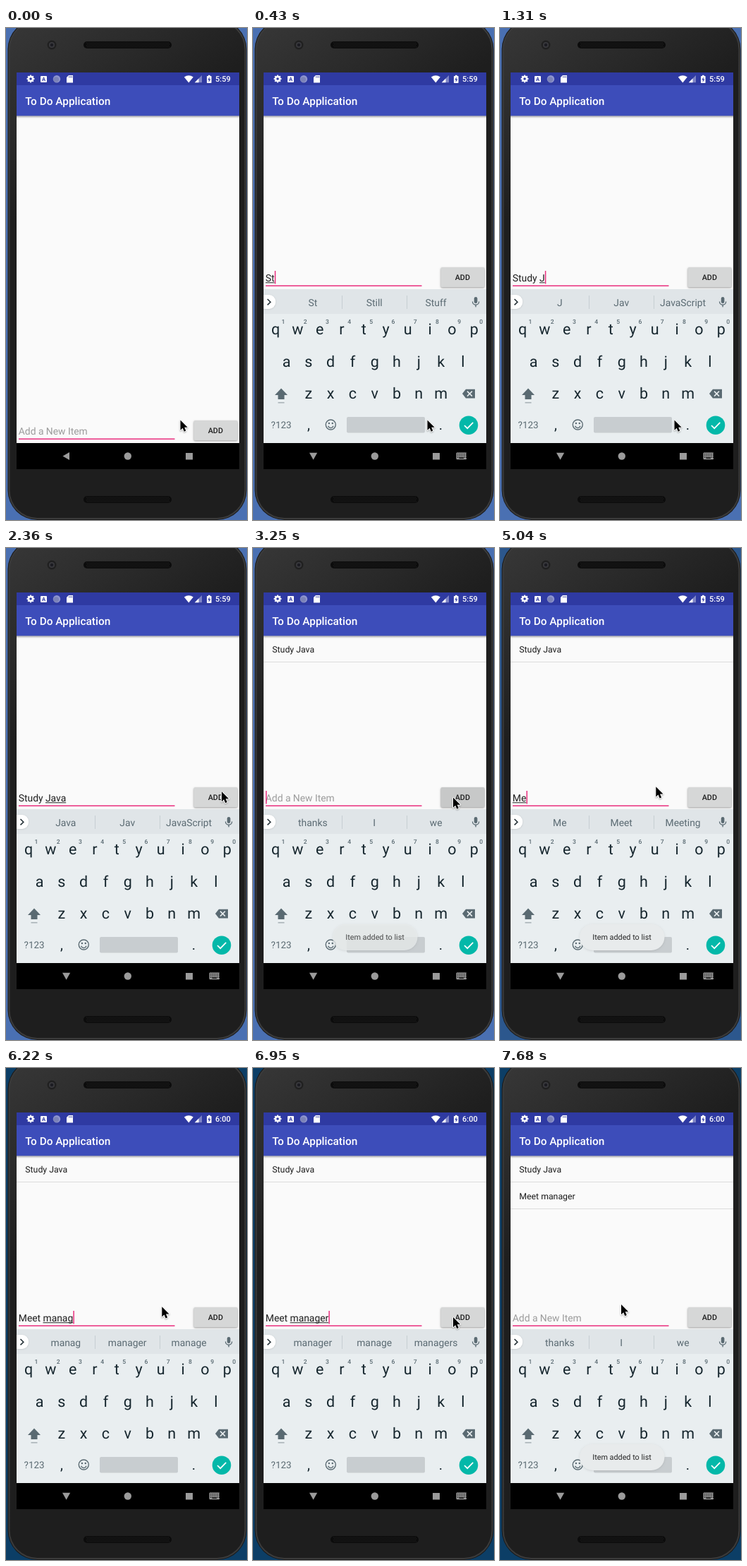
These frames come from a looping animation (342x697 px, 8 s). An HTML page with a canvas:

```html
<!DOCTYPE html>
<html lang="en">
<head>
<meta charset="utf-8">
<title>To Do Application</title>
<style>
html, body { margin: 0; width: 100%; height: 100%; overflow: hidden; background: #4a70b2; }
canvas { display: block; width: 342px; height: 697px; }
</style>
</head>
<body>
<canvas id="stage"></canvas>
<script>
const W = 342, H = 697, LOOP = 8000;
const OPEN = 140, KEY = 147, BLINK = 600;
const canvas = document.getElementById('stage');
const ratio = window.devicePixelRatio || 1;
canvas.width = W * ratio;
canvas.height = H * ratio;
const c = canvas.getContext('2d');
c.textRendering = 'geometricPrecision';
const FONT = 'Roboto, "Noto Sans", sans-serif';
const INK = '#16262e', SOFT = '#5a6a72', PINK = '#ea2f7e', STATUS = '#2f3aa2';

// Each run types one character every KEY ms
const runs = [[280, 'Study '], [1305, 'Java'], [4890, 'Meet manager']];
const tasks = [{ name: 'Study Java', added: 3100 }, { name: 'Meet manager', added: 7390 }];
const dictionary = ('So Still Stuff Study Student Jav JavaScript Java ' +
  'Meet Meeting Meets me my manager manage managers').split(' ');
const moves = [
  { start: 1850, time: 360, x: 306, y: 345 },
  { start: 2560, time: 400, x: 284, y: 353.5 },
  { start: 3260, time: 290, x: 221.3, y: 338.3 },
  { start: 6510, time: 440, x: 284, y: 353 },
  { start: 7390, time: 280, x: 172, y: 335 }
];

const ramp = (t, a, b) => Math.min(1, Math.max(0, (t - a) / (b - a)));
const smooth = p => p * p * (3 - 2 * p);

function inputAt(t) {
  let value = '', last = OPEN;
  const cleared = Math.max(0, ...tasks.map(k => k.added).filter(a => a <= t));
  for (const [start, chars] of runs) {
    if (t < start || start < cleared) continue;
    const n = Math.min(chars.length, Math.floor((t - start) / KEY) + 1);
    value += chars.slice(0, n);
  }
  for (const [start, chars] of runs)
    if (t >= start) last = start + KEY * Math.min(chars.length - 1, Math.floor((t - start) / KEY));
  for (const { added } of tasks)
    if (t >= added + 300) last = Math.max(last, added + 300);
  const caret = t >= OPEN && Math.floor((t - last) / BLINK) % 2 === 0;
  return { value, caret };
}

function suggest(value) {
  const word = value.slice(value.lastIndexOf(' ') + 1);
  if (!word) return ['thanks', 'I', 'we'];
  const stem = word.slice(0, 3);
  return [word, ...dictionary.filter(d => d !== word && d.startsWith(stem))].slice(0, 3);
}

function mouseAt(t) {
  let x = 247.5, y = 555.5;
  for (const m of moves) {
    const p = smooth(ramp(t, m.start, m.start + m.time));
    x += (m.x - x) * p;
    y += (m.y - y) * p;
  }
  return [x, y];
}

function rect(x, y, w, h, fill) {
  c.fillStyle = fill;
  c.fillRect(x, y, w, h);
}
function round(x, y, w, h, r, fill) {
  c.beginPath();
  c.roundRect(x, y, w, h, r);
  c.fillStyle = fill;
  c.fill();
}
function disc(x, y, r, fill) {
  c.beginPath();
  c.arc(x, y, r, 0, Math.PI * 2);
  c.fillStyle = fill;
  c.fill();
}
function arc(x, y, r, from, to, stroke, width) {
  c.beginPath();
  c.arc(x, y, r, from, to);
  c.strokeStyle = stroke;
  c.lineWidth = width;
  c.stroke();
}
function poly(points, fill) {
  c.beginPath();
  points.forEach(([x, y]) => c.lineTo(x, y));
  c.closePath();
  c.fillStyle = fill;
  c.fill();
}
function line(points, stroke, width) {
  c.beginPath();
  points.forEach(([x, y]) => c.lineTo(x, y));
  c.strokeStyle = stroke;
  c.lineWidth = width;
  c.stroke();
}
function text(s, x, y, size, fill, align = 'left', weight = 400) {
  c.font = `${weight} ${size}px ${FONT}`;
  c.textAlign = align;
  c.fillStyle = fill;
  c.fillText(s, x, y);
}
function shadow(color, blur, dy) {
  c.shadowColor = color;
  c.shadowBlur = blur * ratio;
  c.shadowOffsetY = dy * ratio;
}
function noShadow() {
  shadow('transparent', 0, 0);
}
function fade(x0, y0, x1, y1, ...stops) {
  const g = c.createLinearGradient(x0, y0, x1, y1);
  stops.forEach((s, i) => g.addColorStop(i / (stops.length - 1), s));
  return g;
}

function speaker(y) {
  round(110, y, 125, 10, 5, '#0c0c0c');
  c.fillStyle = '#2a2a2a';
  for (let row = 0; row < 4; row++)
    for (let x = 114 + row % 2; x < 232; x += 2) c.fillRect(x, y + 1.5 + row * 2, .9, .9);
}

function drawPhone(t) {
  const k = 1 - (1 - ramp(t, 4800, 5640)) ** 2;
  const mix = (a, b) => Math.round(a + (b - a) * k);
  rect(0, 0, W, H, `rgb(${mix(74, 12)},${mix(112, 62)},${mix(178, 102)})`);
  round(2.5, -12, 339, 709, 42, '#191919');
  round(3.5, -11, 337, 707, 41, '#3b3b3b');
  round(5.5, -9, 333, 703, 39, fade(0, 0, 130, 190, '#373737', '#2b2b2b', '#1e1e1e'));
  speaker(19);
  speaker(663);
  disc(65, 24, 6.5, '#202020');
  disc(65, 24, 4, '#39393d');
  disc(65, 24, 2.3, '#1c1c22');
}

function drawStatus(t) {
  const white = '#fff';
  rect(15, 63, 316, 18, STATUS);
  for (let i = 0; i < 8; i++) {
    const a = i * Math.PI / 4;
    line([[35, 72], [35 + 5.4 * Math.cos(a), 72 + 5.4 * Math.sin(a)]], white, 2.2);
  }
  disc(35, 72, 4.2, white);
  disc(35, 72, 1.8, STATUS);
  round(49, 68, 9, 9, 1, white);
  text('A', 53.5, 75.2, 7.5, STATUS, 'center', 700);
  disc(72, 72.3, 5.2, '#8f95cf');
  disc(71.2, 73, 3.8, '#7c83b8');
  poly([[89, 67], [95, 67], [95, 77.5], [86, 77.5], [86, 70]], white);
  for (let x = 89.3; x < 94; x += 1.9) rect(x, 68.3, .9, 2, STATUS);
  c.beginPath();
  c.moveTo(259.3, 77.6);
  c.lineTo(252.8, 69.5);
  c.quadraticCurveTo(259.3, 65, 265.8, 69.5);
  c.fillStyle = white;
  c.fill();
  poly([[278, 67], [278, 77.3], [267.8, 77.3]], '#7e85c6');
  poly([[273.5, 71.5], [273.5, 77.3], [267.8, 77.3]], white);
  round(285, 68, 6.6, 10, .8, white);
  rect(287, 66.8, 2.6, 1.5, white);
  poly([[289, 69.2], [286.3, 73.6], [288, 73.6], [287.6, 77], [290.4, 72.4], [288.6, 72.4]], STATUS);
  text(t < 5340 ? '5:59' : '6:00', 318.7, 76.3, 11, white, 'right', 500);
}

function drawApp(t) {
  rect(15, 63, 316, 562, '#fafafa');
  rect(15, 124, 316, 4, fade(0, 124, 0, 128, 'rgba(0,0,0,.35)', 'rgba(0,0,0,0)'));
  rect(15, 81, 316, 43.4, '#3d4dba');
  text('To Do Application', 27.3, 109, 15.4, '#fff', 'left', 500);
  drawStatus(t);
  tasks.filter(k => t >= k.added).forEach(({ name }, i) => {
    text(name, 27.3, 147.6 + i * 38, 12.3, '#1c1c1c');
    rect(15, 161 + i * 38, 316, 1, '#dcdcdc');
  });
}

function drawInput(t, value, caret, y) {
  const pressed = tasks.some(k => t >= k.added - 150 && t < k.added + 250);
  if (value) {
    text(value, 17.8, y + 5, 13.85, '#1d1d1d');
    const start = value.lastIndexOf(' ') + 1;
    const x = 17.8 + c.measureText(value.slice(0, start)).width;
    rect(x, y + 6.3, c.measureText(value.slice(start)).width, 1, '#222');
  } else {
    text('Add a New Item', 17.8, y + 5, 13.85, '#9b9b9b');
  }
  rect(18, y + 10.5, 221.5, 1.5, PINK);
  if (caret) rect(18 + c.measureText(value).width * !!value, y - 10, 1.5, 18.5, PINK);
  shadow('rgba(0,0,0,.38)', 2.5, 1);
  round(266.5, y - 15, 62, 28.3, 2, pressed ? '#c7c8c8' : '#d6d7d7');
  noShadow();
  text('ADD', 297.3, y + 2.9, 10.77, '#1d1d1d', 'center', 500);
}

function drawKeys() {
  const row = (letters, x, y) =>
    [...letters].forEach((ch, i) => text(ch, x + i * 31.3, y, 21.5, INK, 'center'));
  row('qwertyuiop', 32, 434);
  row('asdfghjkl', 47.5, 480);
  row('zxcvbnm', 78.8, 525);
  [...'1234567890'].forEach((d, i) => text(d, 43 + i * 31.2, 419, 8.6, SOFT, 'center', 500));

  poly([[40, 510.5], [49, 520], [44.5, 520], [44.5, 526], [35.5, 526], [35.5, 520], [31, 520]], SOFT);
  rect(35.5, 530, 9, 1.5, '#a7b1b6');
  poly([[297, 518], [302, 511.7], [315, 511.7], [315, 524.5], [302, 524.5]], SOFT);
  line([[304, 514.6], [311, 521.6]], '#eaeef0', 1.5);
  line([[311, 514.6], [304, 521.6]], '#eaeef0', 1.5);

  text('?123', 40, 567, 13.4, SOFT, 'center');
  text(',', 79, 569, 20, INK, 'center');
  arc(110.3, 562, 7, 0, Math.PI * 2, SOFT, 1.4);
  disc(107.9, 560, 1.2, SOFT);
  disc(112.8, 560, 1.2, SOFT);
  arc(110.3, 562.8, 3.7, .25, Math.PI - .25, SOFT, 1.4);
  round(133, 551, 111, 22.5, 2, '#c8cdd0');
  text('.', 266.5, 569, 20, INK, 'center');
  disc(306, 562.7, 13.3, '#04b8a9');
  line([[300, 563], [304.2, 567.2], [312.3, 558.8]], '#fff', 1.7);
}

function drawKeyboard(words) {
  rect(15, 370, 316, 218, '#e9eef0');
  rect(15, 370, 316, 35, '#e0e5e8');
  shadow('rgba(0,0,0,.15)', 2, .5);
  round(15, 378, 17, 20, [0, 9, 9, 0], '#fff');
  noShadow();
  line([[20.5, 384], [24.8, 388.2], [20.5, 392.4]], '#263238', 1.6);
  words.forEach((w, i) => text(w, 84.8 + i * 87.4, 393.5, 13.85, SOFT, 'center'));
  rect(126, 379, 1, 19, '#c6ced2');
  rect(218, 379, 1, 19, '#c6ced2');
  round(313.8, 381, 4.6, 9, 2.3, SOFT);
  arc(316.1, 387.6, 4.6, 0, Math.PI, SOFT, 1.3);
  rect(315.4, 392, 1.4, 3.3, SOFT);
  drawKeys();
}

function drawNav(open) {
  const gray = '#9b9b9b';
  rect(15, 588, 316, 37, '#000');
  poly(open ? [[80, 601.8], [91.2, 601.8], [85.6, 611.8]] : [[80.5, 606.5], [90, 601], [90, 612]], gray);
  disc(172.8, 606.5, 5.2, gray);
  rect(255, 602, 10, 9.5, gray);
  if (!open) return;
  round(288.5, 601.5, 14.5, 9.7, 1, gray);
  for (let y = 603; y < 608; y += 2.4)
    for (let x = 290; x < 302; x += 2.4) rect(x, y, 1.2, 1.2, '#000');
  rect(292.5, 608.6, 6.5, 1.2, '#000');
}

function drawToast(age) {
  const alpha = ramp(age, -50, 200) * (1 - ramp(age, 2000, 2350));
  if (!alpha) return;
  c.globalAlpha = alpha;
  shadow('rgba(0,0,0,.1)', 3, 1);
  round(113, 532.5, 120.5, 37.5, 18.7, '#e8ebec');
  noShadow();
  text('Item added to list', 173, 555.2, 10.8, '#262626', 'center');
  c.globalAlpha = 1;
}

function drawMouse(x, y) {
  const shape = [[0, 0], [0, 14.2], [3.2, 11.3], [5.3, 16.2], [7.8, 15.1], [5.7, 10.3], [10.2, 10.2]];
  c.save();
  c.translate(x, y);
  c.lineJoin = 'round';
  shadow('rgba(0,0,0,.3)', 2, 1);
  line([...shape, shape[0]], '#fff', 2);
  noShadow();
  poly(shape, '#000');
  c.restore();
}

function draw(t) {
  const open = t >= OPEN;
  const { value, caret } = inputAt(t);
  c.setTransform(ratio, 0, 0, ratio, 0, 0);
  drawPhone(t);
  drawApp(t);
  drawInput(t, value, caret, open ? 354 : 571);
  if (open) drawKeyboard(suggest(value));
  drawNav(open);
  tasks.forEach(k => drawToast(t - k.added));
  drawMouse(...mouseAt(t));
}

const begin = performance.now();
function tick() {
  draw((performance.now() - begin) % LOOP);
  requestAnimationFrame(tick);
}
tick();
</script>
</body>
</html>
```
